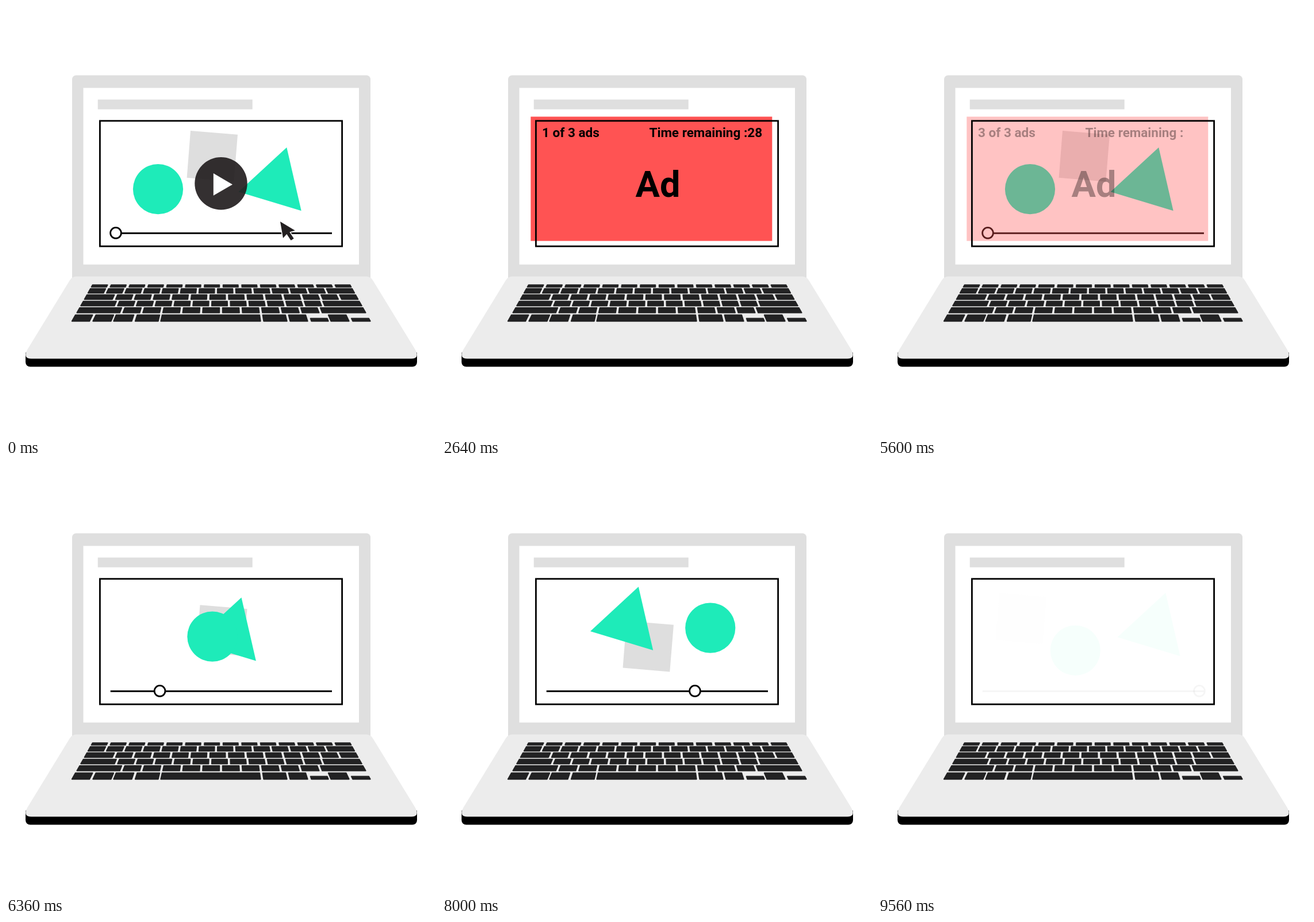
Animation of 748 by 748 pixels, one loop 9600 ms. Source, as an HTML page with a canvas:

```html
<!DOCTYPE html>
<html lang="en">
<head>
<meta charset="utf-8">
<title>Video ads on a laptop</title>
<style>
  html, body { margin: 0; width: 100%; height: 100%; overflow: hidden; background: #fff; }
  canvas { display: block; width: 748px; height: 748px; }
</style>
</head>
<body>
<canvas id="stage" width="748" height="748"></canvas>
<script>
const ctx = document.getElementById('stage').getContext('2d');
const LOOP = 9600;
const GREEN = '#1eebb9', GREY = '#dfdfdf', DARK = '#231f20', RED = '#ff5353';

const clamp = v => Math.max(0, Math.min(1, v));
const mix = (a, b, k) => a + (b - a) * k;
const ramp = (t, from, to) => clamp((t - from) / (to - from));
const ease = (t, from, to) => {
  const s = ramp(t, from, to);
  return s * s * (3 - 2 * s);
};

function fillRect(color, left, top, right, bottom) {
  ctx.fillStyle = color;
  ctx.fillRect(left, top, right - left, bottom - top);
}

function polygon(points) {
  ctx.beginPath();
  points.forEach(([x, y]) => ctx.lineTo(x, y));
  ctx.closePath();
}

function fillPolygon(color, points) {
  polygon(points);
  ctx.fillStyle = color;
  ctx.fill();
}

function disc(color, x, y, r) {
  ctx.beginPath();
  ctx.arc(x, y, r, 0, Math.PI * 2);
  ctx.fillStyle = color;
  ctx.fill();
}

function withAlpha(alpha, draw) {
  ctx.save();
  ctx.globalAlpha = alpha;
  draw();
  ctx.restore();
}

// Keyboard: keys are laid out along each row's bottom edge and narrow towards the top.
const CENTER = 374.5;
const halfWidth = y => 227 + 0.563 * (y - 489.5);

function key(left, right, top, bottom) {
  const shrink = halfWidth(top + 1) / halfWidth(bottom - 1);
  const up = x => CENTER + (x - CENTER) * shrink;
  const l = left + 1.3, r = right - 1.3;
  polygon([[up(l), top + 1], [up(r), top + 1], [r, bottom - 1], [l, bottom - 1]]);
  ctx.fill();
  ctx.stroke();
}

function keyRow(top, bottom, first, count, last, gap) {
  const half = halfWidth(bottom);
  const ends = (first ? first + gap : 0) + (last ? last + gap : 0);
  const width = (2 * half - ends - gap * (count - 1)) / count;
  const widths = Array(count).fill(width);
  if (first) widths.unshift(first);
  if (last) widths.push(last);
  let x = CENTER - half;
  for (const w of widths) {
    key(x, x + w, top, bottom);
    x += w + gap;
  }
}

function drawKeyboard() {
  ctx.fillStyle = ctx.strokeStyle = '#222223';
  ctx.lineWidth = 2;
  ctx.lineJoin = 'round';
  keyRow(484.3, 489.8, 0, 14, 0, 4);
  keyRow(490.8, 500.2, 0, 13, 48, 2.8);
  keyRow(501.5, 511.2, 51, 12, 31, 3.2);
  keyRow(512.7, 522.6, 61, 11, 67, 3);
  keyRow(524, 534.6, 77, 10, 78, 3);
  const bottomRow = [[113.5, 146.5], [150, 184], [186, 220], [223.5, 266], [268, 444],
    [447, 490], [493, 526], [564, 598]];
  bottomRow.forEach(([l, r]) => key(l, r, 536.5, 549.2));
  [[530, 562], [602, 635]].forEach(([l, r]) => key(l, r, 542.5, 549.2));
}

function drawLaptop() {
  ctx.beginPath();
  ctx.roundRect(115, 120.5, 519, 360, [7, 7, 0, 0]);
  ctx.fillStyle = GREY;
  ctx.fill();
  fillRect('#fff', 134.5, 142.5, 614, 449.7);
  fillRect(GREY, 159.7, 162.7, 428.7, 179.7);

  ctx.beginPath();
  ctx.roundRect(34, 598, 681, 29.5, 8);
  ctx.fillStyle = '#000';
  ctx.fill();

  // White notches keep the lid and the black edge outside the slanted sides.
  fillPolygon('#fff', [[100, 474], [115, 474], [36, 602], [30, 602], [30, 590]]);
  fillPolygon('#fff', [[649, 474], [634, 474], [713, 602], [719, 602], [719, 590]]);

  ctx.beginPath();
  ctx.moveTo(122, 470.5);
  ctx.lineTo(627, 470.5);
  ctx.quadraticCurveTo(634, 470.5, 638, 477);
  ctx.lineTo(712, 598);
  ctx.quadraticCurveTo(720, 613.5, 705, 613.5);
  ctx.lineTo(44, 613.5);
  ctx.quadraticCurveTo(29, 613.5, 37, 598);
  ctx.lineTo(111, 477);
  ctx.quadraticCurveTo(115, 470.5, 122, 470.5);
  ctx.fillStyle = '#ececec';
  ctx.fill();
  drawKeyboard();
}

// Video: each shape passes from rest through a middle offset to a final one.
const VIDEO_START = 5633, VIDEO_MIDDLE = 7383, VIDEO_END = 9133;

function shapeOffset(t, middle, end) {
  const a = ease(t, VIDEO_START, VIDEO_MIDDLE);
  const b = ease(t, VIDEO_MIDDLE, VIDEO_END);
  return [0, 1].map(i => middle[i] * a + (end[i] - middle[i]) * b);
}

function drawMoved(offset, draw) {
  ctx.save();
  ctx.translate(...offset);
  draw();
  ctx.restore();
}

function drawVideo(t) {
  drawMoved(shapeOffset(t, [44, 75.3], [-110, 7.5]), () =>
    fillPolygon('#dedede', [[321, 217], [403, 223.8], [396.3, 305.5], [314.6, 298.7]]));
  drawMoved(shapeOffset(t, [-210, -36.6], [12, -22]), () =>
    fillPolygon(GREEN, [[488.3, 246], [513.7, 356.3], [404.5, 323.3]]));
  drawMoved(shapeOffset(t, [251.7, -49.2], [78.8, 5.7]), () =>
    disc(GREEN, 264.5, 318.6, 43.6));

  fillRect('#000', 181.7, 393.8, 567, 396.7);
  disc('#fff', mix(191, 559, ramp(t, VIDEO_START, VIDEO_END)), 394.8, 9.4);
  ctx.strokeStyle = '#000';
  ctx.lineWidth = 2.8;
  ctx.stroke();
}

function drawPlayButton(t) {
  const press = ease(t, 1200, 1367) - ease(t, 1367, 1533);
  withAlpha(mix(0.92, 0.7, press), () => disc(DARK, 374, 308.8, 45.7));
  fillPolygon('#fff', [[360.8, 291], [394, 310.4], [360.8, 329.8]]);
}

function drawArrow(x, y) {
  ctx.save();
  ctx.translate(x, y);
  polygon([[0, 0], [25.7, 15.5], [16.3, 18.3], [23.7, 29.5], [18.6, 32.7], [11.3, 21.7], [5, 28.8]]);
  ctx.lineJoin = 'miter';
  ctx.strokeStyle = '#fff';
  ctx.lineWidth = 3;
  ctx.stroke();
  ctx.fillStyle = DARK;
  ctx.fill();
  ctx.restore();
}

function drawHand() {
  const hand = new Path2D(`M387.5 350V331.5Q387.5 328.5 390.3 328.5Q393 328.5 393 331.5V341
    Q393.5 338.8 396 339Q398.8 339.2 399 342Q399.8 340.3 402 340.6Q404.7 341 404.8 343.8
    Q406 342.3 408 343Q410.5 344 410.5 347L410 354Q409 365.5 398 365.5
    Q390 365.5 386.5 360L379 349.5Q377.5 346.5 379.5 345.3Q382 344.3 384.5 347Z`);
  ctx.fillStyle = '#fff';
  ctx.fill(hand);
  ctx.strokeStyle = '#333';
  ctx.lineWidth = 1.5;
  ctx.lineJoin = 'round';
  ctx.stroke(hand);
  ctx.stroke(new Path2D('M393 341V346.5M399 342V347.5M404.8 343.8V348.5'));
}

function drawPointer(t) {
  if (t >= 1033) return drawHand();
  const k = ease(t, 367, 1033);
  drawArrow(mix(477, 387, k), mix(375, 324, k));
}

function text(string, x, y, size) {
  ctx.font = `bold ${size}px Roboto, sans-serif`;
  ctx.fillStyle = '#000';
  ctx.fillText(string, x, y);
}

function drawAd(t, alpha) {
  withAlpha(alpha, () => {
    fillRect(RED, 154.3, 192.5, 574.3, 408.7);
    text('Ad', 336.6, 332.3, 63);
  });
  withAlpha(alpha * ease(t, 1967, 2200), () => {
    const adNumber = 1 + (t >= 3533) + (t >= 4533);
    const seconds = Math.min(30, 28 - Math.floor((t - 2634) / 101.4));
    const clock = seconds > 0 ? String(seconds).padStart(2, '0') : '';
    text(`${adNumber} of 3 ads`, 174, 228, 22.5);
    text(`Time remaining :${clock}`, 360.5, 228, 22.5);
  });
}

function draw(t) {
  fillRect('#fff', 0, 0, 748, 748);
  drawLaptop();
  withAlpha(1 - ease(t, VIDEO_END, 9620), () => drawVideo(t));
  if (t < 1700) {
    drawPlayButton(t);
    drawPointer(t);
  }
  const adAlpha = ease(t, 1533, 1700) - ease(t, 5500, 5667);
  if (adAlpha > 0) drawAd(t, adAlpha);
  ctx.strokeStyle = '#000';
  ctx.lineWidth = 2.8;
  ctx.lineJoin = 'miter';
  ctx.strokeRect(163.4, 199.8, 421.2, 218.2);
}

const start = performance.now();
function tick() {
  draw((performance.now() - start) % LOOP);
  requestAnimationFrame(tick);
}
tick();
</script>
</body>
</html>
```
